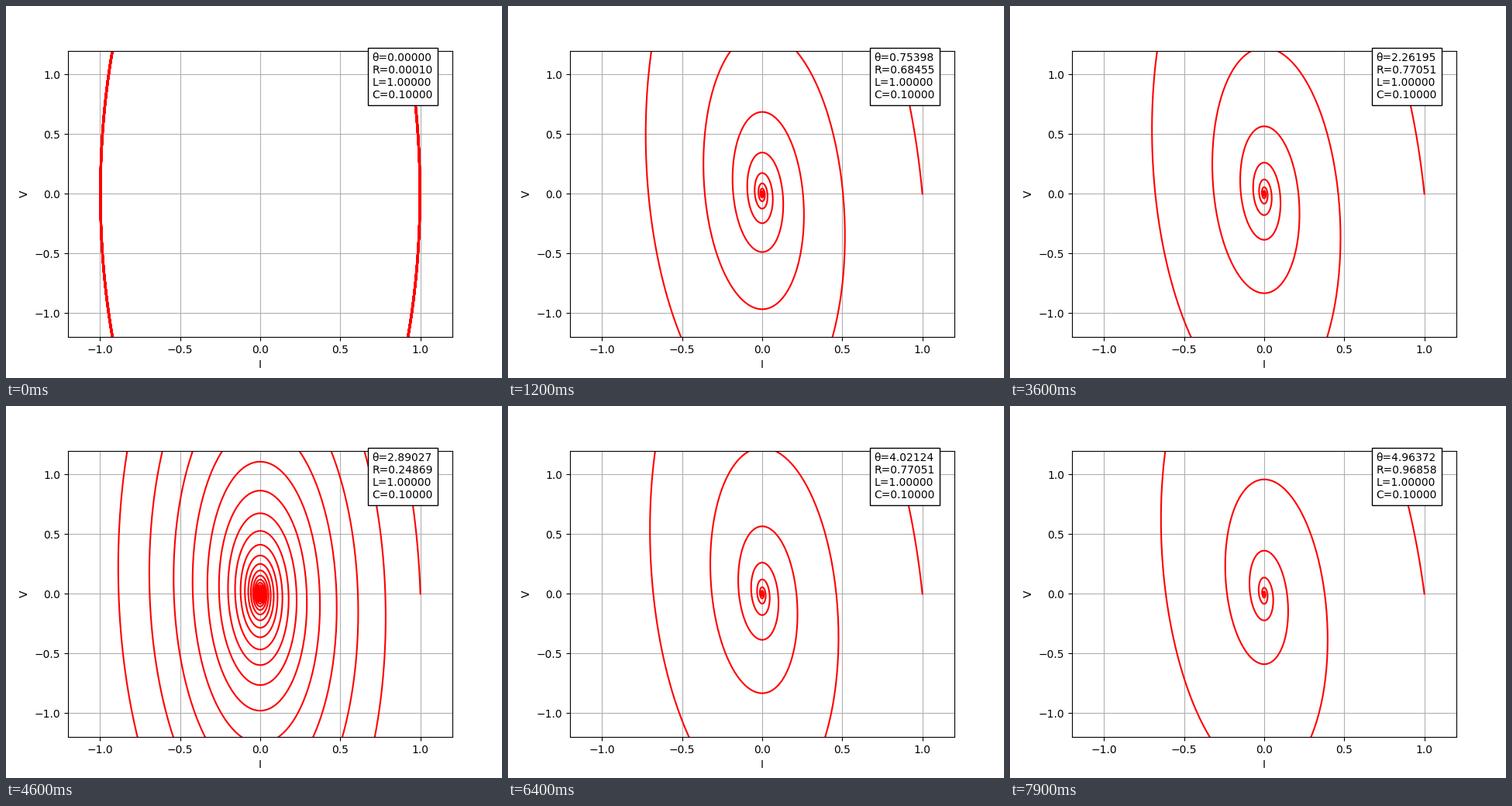
A matplotlib script that plays this animation: 640 by 480 pixels, repeating every 8 s.

```python
import numpy as np
import matplotlib.pyplot as plt
from matplotlib.animation import FuncAnimation

L, C = 1.0, 0.1
R_MIN = 1e-4
STEPS_PER_TURN = 100
FRAMES, INTERVAL = 80, 100
t = np.linspace(0, 100, 10001)


def rlc_orbit(r):
    """Free response of a series RLC circuit from I=1, V=0."""
    decay = r / (2 * L)
    omega = np.sqrt(1 / (L * C) - decay**2)
    envelope = np.exp(-decay * t)
    sin, cos = np.sin(omega * t), np.cos(omega * t)
    current = envelope * (cos - decay / omega * sin)
    voltage = envelope * sin / (C * omega)
    return current, voltage


plt.rcParams["font.family"] = "DejaVu Sans"
fig, ax = plt.subplots(figsize=(6.4, 4.8), dpi=100)
ax.set(xlim=(-1.2, 1.2), ylim=(-1.2, 1.2), xlabel="I", ylabel="V")
ax.grid()
line, = ax.plot([], [], color="red")
info = ax.text(0.7, 0.8, "", bbox=dict(facecolor="white", edgecolor="black"))


def update(i):
    theta = 2 * np.pi * i / STEPS_PER_TURN
    r = max(abs(np.sin(theta)), R_MIN)
    line.set_data(*rlc_orbit(r))
    info.set_text(f"θ={theta:.5f}\nR={r:.5f}\nL={L:.5f}\nC={C:.5f}")
    return line, info


anim = FuncAnimation(fig, update, frames=FRAMES, interval=INTERVAL,
                     repeat=True, repeat_delay=0)
plt.show()
```
